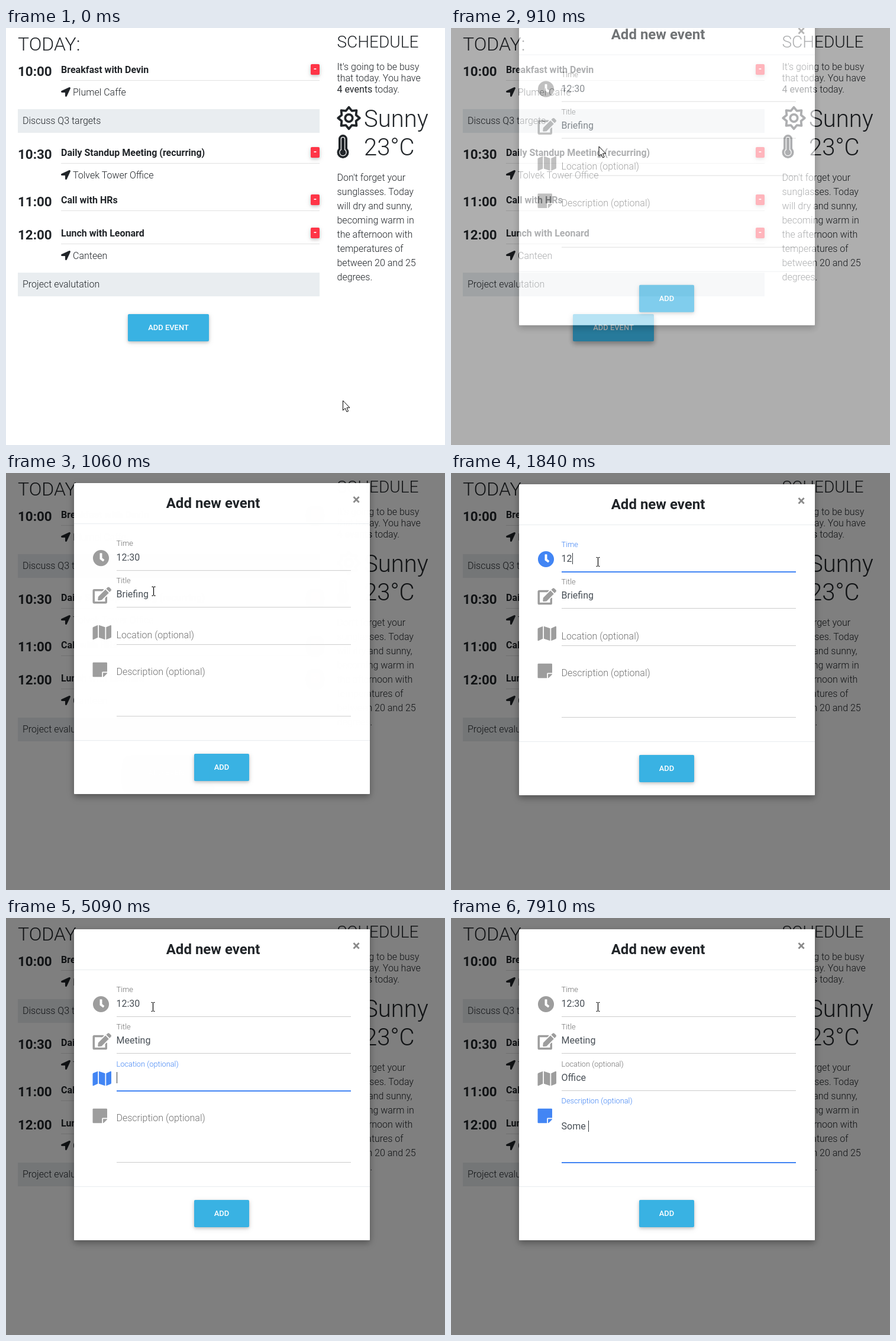
These frames come from a looping animation (742x704 px, 8 s). An HTML page:

```html
<!DOCTYPE html>
<html lang="en">
<head>
<meta charset="utf-8">
<title>Schedule</title>
<style>
  html, body { margin: 0; width: 100%; height: 100%; overflow: hidden; background: #fff; }
  svg { display: block; width: 100%; height: 100%; font: 300 16px Roboto, sans-serif; fill: #212529; }
  text { white-space: pre; }
  .bold { font-weight: 700; }
  .btn { fill: #39b2e3; filter: drop-shadow(0 2px 2.5px rgba(0,0,0,.16)) drop-shadow(0 2px 4px rgba(0,0,0,.12)); }
  .btn.hover { filter: drop-shadow(0 4px 4px rgba(0,0,0,.22)) drop-shadow(0 3px 5px rgba(0,0,0,.16)); }
  .btn-text { font-size: 12.96px; font-weight: 500; fill: #fff; text-anchor: middle; }
  .panel { fill: #fff; filter: drop-shadow(0 5px 5.5px rgba(0,0,0,.2)) drop-shadow(0 3px 6px rgba(0,0,0,.16)); }
</style>
</head>
<body>
<svg id="stage" viewBox="0 0 742 704">
  <g id="page"></g>
  <path id="backdrop" fill="#000" fill-rule="evenodd"/>
  <g id="modal"></g>
  <path id="arrow" d="M.5 0V16.5L4.3 13 7 19 9.6 17.8 7 12H12Z" fill="#fff" stroke="#000"/>
  <path id="beam" d="M-3-7.5H-.7M.7-7.5H3M0-7V7M-3 7.5H-.7M.7 7.5H3" fill="none" stroke="#000" stroke-width="1.2"/>
</svg>
<script>
const LOOP = 8000;
const $ = id => document.getElementById(id);
const page = $('page'), modal = $('modal');

const PATHS = {
  place: 'M444.5 3.5L28.7 195.4c-48 22.4-32 92.8 19.2 92.8h175.9v175.9c0 51.2 70.4 67.2 92.8 19.2l191.9-415.8c16-38.4-25.6-80-64-64z',
  thermo: 'M224 96a96 96 0 0 0-192 0v203.3C12.2 321.8 0 351 0 384a128 128 0 0 0 256 0c0-32.5-12-62-32-84.7zM128 464a80 80 0 0 1-80-80c0-34 19.300-52 32-66.500V96a48 48 0 0 1 96 0v221.500c12.600 14.300 32 32.200 32 66.500a80 80 0 0 1-80 80zM192 384a64 64 0 1 1-96-55.400V96a32 32 0 0 1 64 0v232.600a64 64 0 0 1 32 55.400z',
  clock: 'M256 8a248 248 0 1 0 0 496 248 248 0 0 0 0-496zM313 358L225 294q-5-4-5-10V116a12 12 0 0 1 12-12h48a12 12 0 0 1 12 12V253.700l63.500 46.200a12 12 0 0 1 2.600 16.800l-28.200 38.800A12 12 0 0 1 313 358z',
  edit: 'M402.600 83.200l90.200 90.200q7 7 0 13.800L274.400 405.600l-92.800 10.300c-12.400 1.400-22.900-9.100-21.500-21.500l10.300-92.800L388.800 83.200q7-7 13.800 0zM564.600 60.300l-48.800-48.800c-15.200-15.200-39.900-15.200-55.200 0l-35.400 35.400q-7 7 0 13.800l90.200 90.200q7 7 13.800 0l35.400-35.400c15.200-15.300 15.200-40 0-55.200zM384 346.200V448H64V128h229.800q5 0 8.500-3.500l40-40c7.600-7.600 2.200-20.500-8.500-20.500H48a48 48 0 0 0-48 48v352a48 48 0 0 0 48 48h352a48 48 0 0 0 48-48V306.200c0-10.700-12.900-16-20.500-8.500l-40 40q-3.500 3.500-3.500 8.500z',
  map: 'M0 117.700V464c0 11.300 11.400 19 22 14.900L160 416V32L20 88A32 32 0 0 0 0 117.700zM192 416l192 64V96L192 32zM554 33.200L416 96v384l140-56a32 32 0 0 0 20-29.700V48c0-11.300-11.400-19-22-14.800z',
  note: 'M312 320h136V56a24 24 0 0 0-24-24H24A24 24 0 0 0 0 56v400a24 24 0 0 0 24 24h264V344a24 24 0 0 1 24-24zM441 375l-98 98q-7 7-17 7h-6V352h128v6q0 10-7 17z'
};

function add(parent, tag, attrs, content) {
  const el = document.createElementNS('http://www.w3.org/2000/svg', tag);
  set(el, attrs);
  if (content) el.textContent = content;
  return parent.appendChild(el);
}
function set(el, attrs) {
  for (const key in attrs) el.setAttribute(key, attrs[key]);
}
const text = (parent, x, y, content, attrs = {}) => add(parent, 'text', { x, y, ...attrs }, content);
const rect = (parent, x, y, width, height, attrs = {}) => add(parent, 'rect', { x, y, width, height, ...attrs });
const icon = (parent, name, x, y, size) => add(parent, 'path', {
  d: PATHS[name], 'fill-rule': 'evenodd', transform: `translate(${x} ${y}) scale(${size / 512})`
});
function button(parent, x, y, width, label) {
  const box = rect(parent, x, y, width, 46, { rx: 2, class: 'btn' });
  text(parent, x + width / 2, y + 27, label, { class: 'btn-text' });
  return box;
}

// Page
function event(y, time, title, place, note) {
  text(page, 20, y + 11, time, { class: 'bold', 'font-size': 22.4 });
  text(page, 93, y + 6, title, { class: 'bold' });
  rect(page, 515, y - 9, 15, 18, { rx: 2, class: 'btn', style: 'fill:#ff3547' });
  text(page, 522.5, y + 4, '-', { class: 'bold', 'font-size': 14, fill: '#fff', 'text-anchor': 'middle' });
  rect(page, 93, y + 18, 437, 1, { fill: '#e2e2e2' });
  if (place) {
    icon(page, 'place', 93, y + 30, 16);
    text(page, 113, y + 44, place);
  }
  if (note) {
    rect(page, 20, y + 67, 510, 40, { fill: '#e9edf0' });
    text(page, 28, y + 92, note);
  }
}

function sun(cx, cy) {
  const points = [];
  for (let i = 0; i < 16; i++) {
    const r = i % 2 ? 13.1 : 18.3, a = i * Math.PI / 8;
    points.push(cx + r * Math.cos(a), cy + r * Math.sin(a));
  }
  const line = { fill: 'none', stroke: '#212529', 'stroke-width': 3.75, 'stroke-linejoin': 'round' };
  add(page, 'polygon', { points, ...line });
  add(page, 'circle', { cx, cy, r: 6.25, ...line });
}

text(page, 20, 38, 'TODAY:', { 'font-size': 32 });
event(70, '10:00', 'Breakfast with Devin', 'Plumel Caffe', 'Discuss Q3 targets');
event(210, '10:30', 'Daily Standup Meeting (recurring)', 'Tolvek Tower Office');
event(290, '11:00', 'Call with HRs');
event(346, '12:00', 'Lunch with Leonard', 'Canteen', 'Project evalutation');
const opener = button(page, 206, 483, 137, 'ADD EVENT');

text(page, 559.5, 33, 'SCHEDULE', { 'font-size': 28 });
text(page, 559.5, 71, "It's going to be busy");
text(page, 559.5, 90, 'that today. You have');
const count = text(page, 559.5, 109, '');
add(count, 'tspan', { 'font-weight': 400 }, '4 events');
add(count, 'tspan', {}, ' today.');
sun(579.5, 152);
icon(page, 'thermo', 559.5, 180, 40);
text(page, 605, 167, 'Sunny', { 'font-size': 40 });
text(page, 605, 215, '23°C', { 'font-size': 40 });
["Don't forget your", 'sunglasses. Today', 'will dry and sunny,', 'becoming warm in', 'the afternoon with',
  'temperatures of', 'between 20 and 25', 'degrees.'].forEach((row, i) => text(page, 559.5, 258 + 24 * i, row));

// Modal
rect(modal, 115, 19, 500, 525, { rx: 2, class: 'panel' });
text(modal, 350, 61, 'Add new event', { class: 'bold', 'font-size': 24, 'text-anchor': 'middle' });
text(modal, 592, 55, '×', { class: 'bold', 'font-size': 24, fill: '#8a8a8a', 'text-anchor': 'middle' });
rect(modal, 115, 87, 500, 1, { fill: '#e9ecef' });
rect(modal, 115, 453, 500, 1, { fill: '#e9ecef' });
button(modal, 318, 476, 93, 'ADD');

const mark = rect(modal, 187, 0, 0, 19, { fill: '#3390ff' });
const field = (name, glyph, value, iconY, labelY, valueY, lineY, focus, blur) => ({
  value, labelY, valueY, focus, blur,
  icon: icon(modal, glyph, 146.5, iconY, 28),
  label: text(modal, 186.5, labelY, name),
  input: text(modal, 186.5, valueY, '', { 'font-weight': 400 }),
  line: rect(modal, 187, lineY, 396, 1)
});
const fields = [
  field('Time', 'clock', '12:30', 131.5, 125, 150, 166, 1600, 2980),
  field('Title', 'edit', 'Briefing', 194.3, 188, 212, 228, 2980, 4840),
  field('Location (optional)', 'map', '', 257, 251, 275, 291, 4840, 6800),
  field('Description (optional)', 'note', '', 320, 313, 357, 412, 6800, LOOP + 400)
];
const caret = rect(modal, 0, 0, 1, 19, { fill: '#343a40' });

// Typing: time, field, value, cursor state
const OFF = 0, ON = 1, SELECTED = 2;
const steps = [[1600, 0, '12:30', SELECTED], [2980, 1, 'Briefing', SELECTED], [4710, 1, 'Meeting', OFF],
  [4840, 2, '', ON], [5340, 2, '', OFF], [6590, 2, 'Office', OFF], [6800, 3, '', ON]];
function type(index, word, times) {
  times.forEach((time, i) => steps.push([time, index, word.slice(0, i + 1), ON]));
}
type(0, '12:30', [1760, 1840, 2380, 2530, 2700]);
type(1, 'Meeting', [3380, 3610, 3780, 3930, 4080, 4120, 4160]);
type(2, 'Office', [5510, 5660, 5810, 5890, 5960, 6040]);
type(3, 'Some ', [7440, 7590, 7660, 7740, 7910]);
steps.sort((a, b) => a[0] - b[0]);

// Pointer: time, x, y
const route = [[0, 569, 629], [480, 292, 512], [720, 276, 505], [910, 249.5, 200],
  [1100, 249.5, 199.500], [1480, 248.5, 150], [LOOP, 248.5, 150]];

const clamp = v => Math.min(1, Math.max(0, v));
const easeOut = v => 1 - (1 - clamp(v)) ** 2;
const BLUE = [66, 133, 244];
const tint = (grey, k) => `rgb(${BLUE.map(c => Math.round(grey + (c - grey) * k))})`;

function drawPointer(t) {
  const i = route.findIndex(p => p[0] > t);
  const [t0, x0, y0] = route[i - 1], [t1, x1, y1] = route[i];
  const u = (t - t0) / (t1 - t0), k = u * u * (3 - 2 * u);
  const transform = `translate(${x0 + (x1 - x0) * k} ${y0 + (y1 - y0) * k})`;
  const typing = t > 980;
  set($('arrow'), { transform, visibility: typing ? 'hidden' : 'visible' });
  set($('beam'), { transform, visibility: typing ? 'visible' : 'hidden' });
}

function drawFields(t) {
  const values = fields.map(f => f.value);
  let active = -1, state = OFF;
  for (const [time, index, value, mode] of steps) {
    if (time > t) break;
    values[index] = value;
    active = index;
    state = mode;
  }
  fields.forEach((f, i) => {
    const glow = easeOut((t - f.focus) / 200) * (1 - easeOut((t - f.blur) / 200));
    const raised = f.value ? 1 : easeOut((t - f.focus) / 200);
    const selected = i === active && state === SELECTED;
    set(f.icon, { fill: tint(157, glow) });
    set(f.label, { y: f.labelY + 30 * (1 - raised), 'font-size': 16 - 3.2 * raised, fill: tint(112, glow) });
    set(f.line, { height: 1 + glow, fill: tint(204, glow) });
    set(f.input, { fill: selected ? '#fff' : '#495057' });
    if (f.input.textContent !== values[i]) f.input.textContent = values[i];
  });
  mark.setAttribute('width', 0);
  caret.setAttribute('visibility', state === ON ? 'visible' : 'hidden');
  if (active < 0) return;
  const f = fields[active];
  const width = values[active] ? f.input.getComputedTextLength() : 0;
  if (state === SELECTED) set(mark, { y: f.valueY - 15, width });
  set(caret, { x: Math.round(187 + width), y: f.valueY - 15 });
}

function draw(t) {
  const k = clamp((t - 835) / 266);
  const drop = -83 * (1 - k) ** 2, opacity = 1 - (1 - k) ** 3;
  opener.classList.toggle('hover', t > 480);
  set($('backdrop'), { d: `M0 0H742V704H0ZM115 ${19 + drop}h500v525h-500Z`, opacity: opacity / 2 });
  set(modal, { transform: `translate(0 ${drop})`, opacity });
  drawFields(t);
  drawPointer(t);
}

const start = performance.now();
function tick() {
  draw((performance.now() - start) % LOOP);
  requestAnimationFrame(tick);
}
tick();
</script>
</body>
</html>
```
